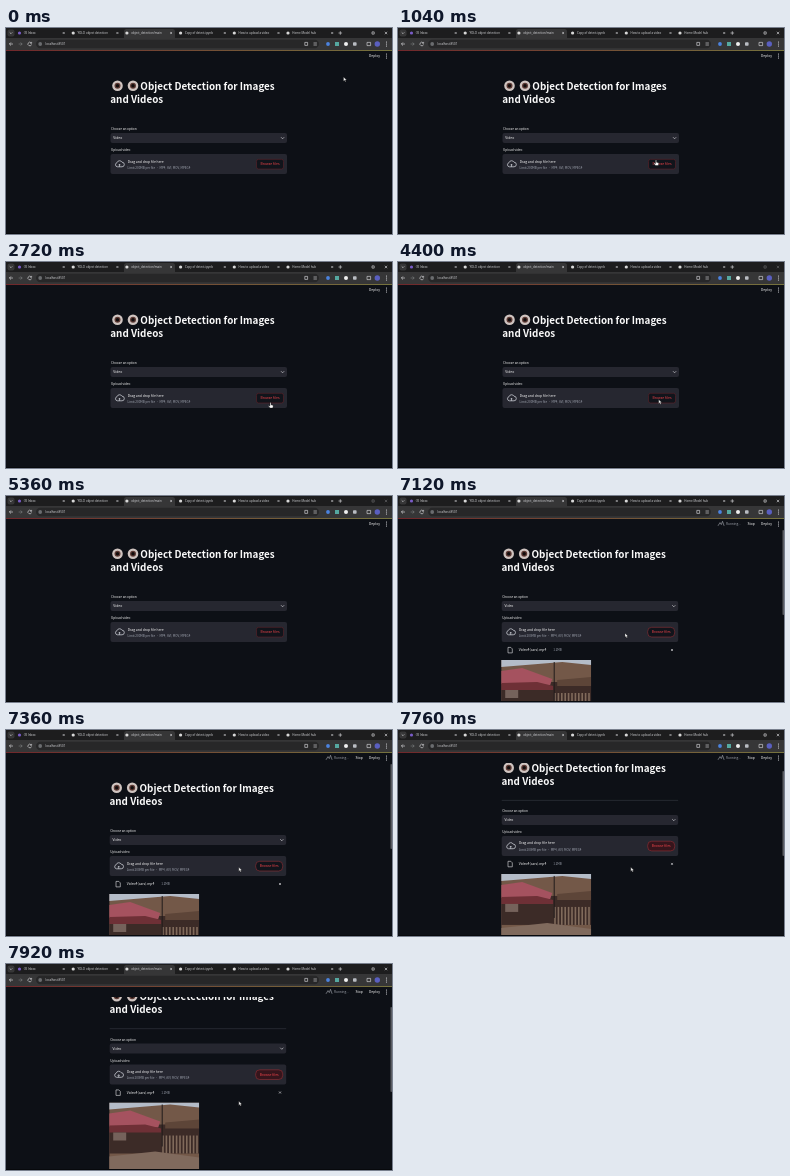
Animation, 386 px wide and 206 px high, one loop 8 s. Source, as an HTML page:

```html
<!DOCTYPE html>
<html lang="en">
<head>
<meta charset="utf-8">
<title>Object Detection</title>
<style>
  html, body { margin: 0; width: 100%; height: 100%; overflow: hidden; background: #0d1016; }
  svg { display: block; width: 100vw; height: 100vh; }
  text { font-family: "Noto Sans CJK SC", "Noto Sans CJK JP", "Noto Sans CJK", "Noto Sans", sans-serif; fill: #fafafa; }
  .heading { font-size: 9.85px; font-weight: 700; }
  .label { font-size: 3.15px; }
  .strong { font-size: 3.4px; font-weight: 500; }
  .hint { font-size: 3px; fill: #a3a8b4; }
  .chrome { font-family: "Open Sans", sans-serif; font-size: 2.95px; fill: #dcdde0; }
  .line { fill: none; stroke: #e2e3e6; stroke-width: .6; }
</style>
</head>
<body>
<svg id="stage" viewBox="0 0 386 206" preserveAspectRatio="none"></svg>
<script>
const LOOP = 8000, BLUR = 4080, UPLOAD = 6960;
const DIALOG = { open: 4720, close: 6000 };
const BAR = '#363637', PAGE = '#0d1016', PANEL = '#262730';

const REST = [337.5, 49];
const GLIDES = [
  { at: 80, span: 800, to: [258, 132] },
  { at: 1120, span: 900, to: [264.5, 140.5] },
  { at: 3440, span: 640, to: [260.7, 137.5] },
  { at: 5700, span: 600, to: [200.5, 136.5] },
  { at: 6640, span: 660, to: [232.8, 137.3] }
];
const SCROLL = { at: 7480, span: 400, by: 25.5 };

const rect = (x, y, w, h, fill, r = 0, extra = '') =>
  `<rect x="${x}" y="${y}" width="${w}" height="${h}" rx="${r}" fill="${fill}" ${extra}/>`;
const dot = (x, y, r, fill) => `<circle cx="${x}" cy="${y}" r="${r}" fill="${fill}"/>`;
const line = (d, extra = '') => `<path class="line" d="${d}" ${extra}/>`;
const text = (x, y, cls, s, extra = '') => `<text x="${x}" y="${y}" class="${cls}" ${extra}>${s}</text>`;
const poly = (points, fill) => `<polygon points="${points}" fill="${fill}"/>`;
const cross = (x, y, r = 1) => line(`M${x - r} ${y - r}l${2 * r} ${2 * r}m0 ${-2 * r}l${-2 * r} ${2 * r}`);
const menu = (x, y) => [-2, 0, 2].map(d => dot(x, y + d, .55, '#e2e3e6')).join('');
const repeat = (n, make) => Array.from({ length: n }, (_, i) => make(i)).join('');

const eye = x => dot(x, 57.7, 5.3, '#cfc4c0') + dot(x, 57.7, 3, '#5d3a34') + dot(x, 57.7, 1.7, '#120d0d');

function tabs() {
  const labels = ['(3) Inbox', 'YOLO object detection', 'object_detection/main',
    'Copy of detect.ipynb', 'How to upload a video', 'Home Model hub'];
  return labels.map((label, i) => {
    const x = 13.5 + 53.7 * i;
    return dot(x, 5, 1.6, i ? '#d8d8d8' : '#7a5cc8') + text(x + 4.3, 6.1, 'chrome', label) + cross(x + 44.2, 5, .9);
  }).join('');
}

function browser() {
  return rect(0, 0, 386, 11, '#1d1d1e') + rect(1.5, 1.5, 7, 7, BAR, 2) +
    line('M3.7 4.4l1.3 1.3 1.3-1.3') + rect(118, 1, 51, 11, BAR, 2.5) + tabs() +
    line('M332.5 5h3.6m-1.8-1.8v3.6') +
    `<g id="controls">${line('M366 3.9h2.2v2.2h-2.2z')}${cross(380, 5, 1.2)}</g>` +
    rect(0, 10, 386, 12, BAR) + rect(30, 11.8, 283, 8.4, '#272728', 4.2) +
    line('M7 16h-3.6m1.6-1.6l-1.6 1.6 1.6 1.6') +
    line('M12.6 16h3.6m-1.6-1.6l1.6 1.6-1.6 1.6', 'opacity=".4"') +
    line('M25.2 14.9a1.8 1.8 0 1 0 .3 1.6m.1-2.6v1.4h-1.4') +
    dot(34.2, 16, 1.9, '#6a6c6f') + text(39.5, 17.1, 'chrome', 'localhost:8501') +
    line('M298.8 14.4h2.8v3h-2.8z') + line('M307.5 15h3.4m-3.4 2h3.4') +
    dot(322, 16, 1.9, '#4b83df') + rect(329, 14, 4, 4, '#55a8a0') +
    dot(340, 16, 2, '#f0f0f0') + rect(347, 14.2, 3.6, 3.6, '#b9bcc2', .8) +
    line('M361 14.4h3.6v3.2h-3.6z') + dot(371.3, 16, 2.7, '#5a5fc0') + menu(380.5, 16);
}

// Hillside, pink roof, shaded house, pole, fence and a dirt road.
function picture() {
  return `<g clip-path="url(#frame)">${rect(104, 164, 90, 68, '#735848')}
    ${poly('104,164 194,164 194,169 165,166 104,171', '#b4bcc8')}
    ${rect(104, 186, 90, 29, '#3c2b27')}
    ${poly('104,175 125,172 155,183 153,189 104,188', '#a5525f')}
    ${poly('104,187 140,186 156,190 156,194 104,194', '#6e3036')}
    ${poly('160,184 194,181 194,190 160,190', '#5d4538')}
    ${rect(108, 194, 13, 8, '#75625b')}
    ${repeat(11, i => rect(157 + i * 3.4, 197, 1.6, 18, '#806a5b'))}
    ${rect(156.5, 166, 1, 42, '#211c1c')}
    ${poly('104,218 150,213 194,219 194,232 104,232', '#806a5d')}</g>`;
}

function uploader() {
  return rect(104.5, 126, 176.5, 20, PANEL, 2) +
    line('M111.3 138.8a2.1 2.1 0 0 1-.3-4.1 2.7 2.7 0 0 1 5-.5 2.3 2.3 0 0 1 0 4.6zm2.2 0v-2.5m-1 .9l1-1 1 1',
      'style="stroke:#c4c7cf;stroke-width:.8"') +
    text(121.7, 134.5, 'strong', 'Drag and drop file here') +
    text(121.5, 140.6, 'hint', 'Limit 200MB per file • MP4, AVI, MOV, MPEG4') +
    rect(250.5, 131.3, 27, 9.7, '#11141b', 2, 'id="button" stroke="#6a2229" stroke-width=".5"') +
    text(264, 137.2, 'strong', 'Browse files', 'text-anchor="middle" style="fill:#f0444a"');
}

function page() {
  return `<g id="content">${eye(111.5)}${eye(127)}
    ${text(134.3, 61.6, 'heading', 'Object Detection for Images')}
    ${text(104.3, 74.8, 'heading', 'and Videos')}
    ${text(105, 102, 'label', 'Choose an option')}
    ${rect(104.5, 105, 176.5, 10, PANEL, 2)}
    ${text(107.3, 111.2, 'strong', 'Video')}
    ${line('M275 109.2l1.6 1.6 1.6-1.6')}
    ${text(105, 123.2, 'label', 'Upload video')}
    ${uploader()}
    ${rect(104.5, 90, 176.5, .6, '#343740', 0, 'id="rule"')}
    <g id="uploaded">
      ${line('M110.8 151.4h2.8l1.5 1.5v4h-4.3z')}
      ${text(121.5, 155.2, 'strong', 'Video4(cars).mp4')}
      ${text(156, 155.1, 'hint', '1.2MB')}
      ${cross(274.8, 154)}${picture()}</g></g>`;
}

function header() {
  return rect(0, 22, 386, 11, PAGE) + rect(0, 22, 386, 1, 'url(#trim)') +
    text(363, 29.2, 'strong', 'Deploy') + menu(380.5, 28) +
    `<g id="running">${line('M320 29.8l2-3.2 1.3 2 1.2-3.3 1.6 4.5', 'style="stroke:#a9adb5"')}
      ${text(328, 29.1, 'label', 'Running...', 'style="fill:#9b9fa8"')}
      ${text(349.5, 29.2, 'strong', 'Stop')}
      ${rect(384.5, 34, 1.5, 85, '#5a5c62', .7, 'id="thumb"')}</g>`;
}

document.getElementById('stage').innerHTML = `
  <defs>
    <linearGradient id="trim"><stop stop-color="#70272b"/><stop offset="1" stop-color="#76733e"/></linearGradient>
    <clipPath id="frame">${rect(104, 164, 90, 68, '#000')}</clipPath>
  </defs>
  ${rect(0, 0, 386, 206, PAGE)}${page()}${header()}${browser()}
  ${rect(0, 205, 386, 1, '#07090c')}
  <g id="pointer" stroke="#111" stroke-width=".35" fill="#fff">
    <path id="arrow" d="M0 0v4.2l1-.9.7 1.5.8-.4-.7-1.4h1.3z"/>
    <path id="hand" d="M-.5 .3q.5-.7 1 0v2l1.8.5q.5.3.4 1l-.5 1.7h-2.6l-1.7-2q.2-.7.9-.3l.7.5z"/>
  </g>`;

const $ = Object.fromEntries(
  ['content', 'rule', 'uploaded', 'running', 'thumb', 'controls', 'pointer', 'arrow', 'hand', 'button']
    .map(id => [id, document.getElementById(id)]));
const show = (el, on) => el.setAttribute('visibility', on ? 'visible' : 'hidden');
const move = (el, x, y) => el.setAttribute('transform', `translate(${x} ${y})`);

function ease(t, { at, span }) {
  const k = Math.min(1, Math.max(0, (t - at) / span));
  return k * k * (3 - 2 * k);
}

const pointerAt = t => GLIDES.reduce((from, glide) =>
  from.map((v, i) => v + (glide.to[i] - v) * ease(t, glide)), REST);

function draw(t) {
  const uploaded = t >= UPLOAD;
  const scroll = SCROLL.by * ease(t, SCROLL);
  const [x, y] = pointerAt(t);
  const visible = t < DIALOG.open || t >= DIALOG.close;
  const over = t < BLUR && x > 250 && x < 278 && y > 131;

  move($.content, uploaded ? -.8 : 0, -scroll);
  move($.thumb, 0, scroll * .35);
  show($.rule, scroll > 0);
  show($.uploaded, uploaded);
  show($.running, uploaded);
  $.controls.setAttribute('opacity', t >= BLUR && !uploaded ? .4 : 1);

  move($.pointer, x, y);
  show($.arrow, visible && !over);
  show($.hand, visible && over);

  $.button.setAttribute('stroke', uploaded ? '#a7343a' : '#6a2229');
  $.button.setAttribute('rx', uploaded ? 4 : 2);
  $.button.setAttribute('fill', scroll > 12 ? '#36151c' : '#11141b');
}

const start = performance.now();
function tick() {
  draw((performance.now() - start) % LOOP);
  requestAnimationFrame(tick);
}
tick();
</script>
</body>
</html>
```
